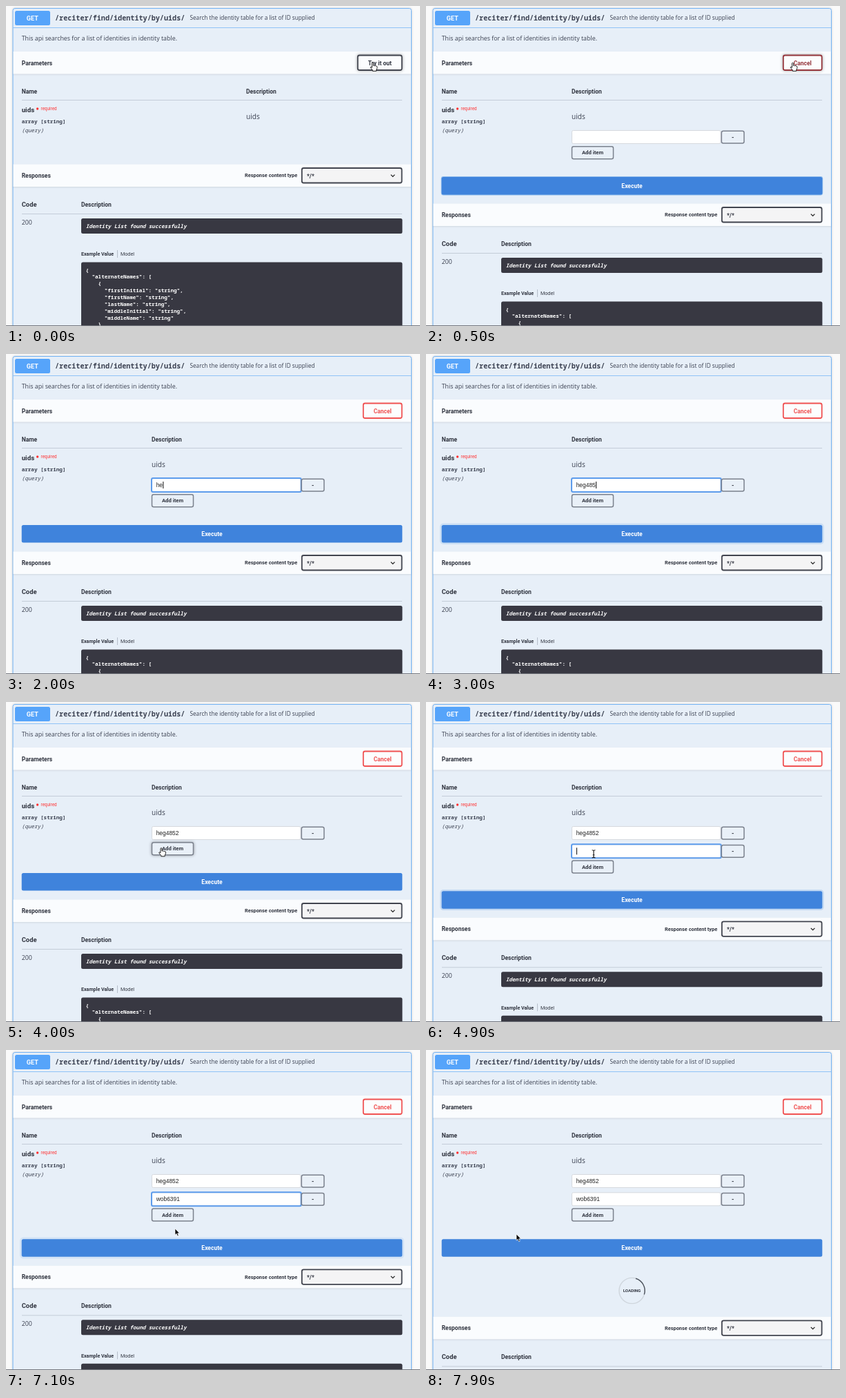
Write an HTML page that moves like this. It is 600 by 464 pixels and loops after 8000 ms.

```html
<!DOCTYPE html>
<html lang="en">
<head>
<meta charset="utf-8">
<title>API explorer</title>
<style>
html, body { margin: 0; width: 100%; height: 100%; overflow: hidden; background: #fafafa; }
svg { display: block; width: 600px; height: 464px; }
text { fill: #3b4151; white-space: pre; }
.h { font: 700 8.5px Roboto, sans-serif; fill: #30343f; }
.o { font: 8.86px "Open Sans", sans-serif; }
.m { font: 600 7.6px "Noto Sans Mono", monospace; }
.in { font: 8.44px "Liberation Sans", Arial, sans-serif; fill: #222; }
.mid { text-anchor: middle; }
.w { fill: #fff; }
.line { stroke: #c3ccd8; stroke-width: 1; }
.band { fill: #fafcfe; filter: drop-shadow(0 1px 1px rgba(0, 0, 0, .1)); }
.dark { fill: #383842; }
.box { fill: #fff; stroke: #d6d9de; }
.btn { fill: #e9f0f8; stroke: #7b818d; stroke-width: 1.5; }
.hover { filter: drop-shadow(0 0 2px rgba(0, 0, 0, .35)); }
.ring { fill: none; stroke: #5d9cec; stroke-width: 2; }
.caret { fill: #111; }
</style>
</head>
<body>
<svg viewBox="0 0 600 464">
  <rect width="600" height="464" fill="#fafafa"/>
  <rect x="10" y="3.5" width="577.5" height="480" rx="3" fill="#e7eff8" stroke="#73b3f5"
    style="filter:drop-shadow(0 0 1.5px rgba(0,0,0,.19))"/>
  <path d="M10 31.5H587" stroke="#8fc2f6"/>
  <rect x="13" y="7" width="51" height="21" rx="2.5" fill="#56a4fa"/>
  <text class="h mid" x="38.3" y="20.7" style="font-size:9px;fill:#fff">GET</text>
  <text class="m" x="71" y="20.7" style="font-size:10.13px">/reciter/find/identity/by/uids/</text>
  <text class="o" x="266.5" y="20.4" style="font-size:8.23px">Search the identity table for a list of ID supplied</text>
  <text class="o" x="22.7" y="50">This api searches for a list of identities in identity table.</text>

  <rect class="band" x="10.5" y="66" width="576.5" height="32.5"/>
  <text class="h" x="22.7" y="85.7">Parameters</text>
  <g id="toggle">
    <rect id="toggleBox" y="71.5" height="21.5" rx="2.5" fill="#fcfdfe" stroke-width="1.8"/>
    <text id="toggleText" class="h mid" y="85.7"></text>
  </g>

  <text class="h" x="22.7" y="126.7">Name</text>
  <path class="line" d="M23 136.5H574"/>
  <text class="h" x="22.7" y="154" style="font-size:9.7px">uids</text>
  <circle cx="45.6" cy="149" r="1.7" fill="#f33"/>
  <text class="h" x="50.6" y="151.2" style="font-weight:400;font-size:6.3px;fill:#f33">required</text>
  <text class="m" x="22.7" y="170">array [string]</text>
  <text class="m" x="22.7" y="183" style="font-weight:400;font-style:italic">(query)</text>
  <g id="desc">
    <text class="h" x="211" y="126.7">Description</text>
    <text class="o" x="211" y="164" style="font-size:10.13px">uids</text>
  </g>

  <g id="form">
    <g id="rows"></g>
    <g id="add">
      <rect class="btn" x="211.5" y="203.7" width="60" height="18" rx="2.5"/>
      <text class="h mid" x="241.5" y="215.3" style="font-size:7.7px">Add item</text>
    </g>
    <g id="exec">
      <rect id="pulse" fill="#4990e2"/>
      <rect x="22.7" y="248" width="551.6" height="25.5" rx="2.5" fill="#3f83dc"/>
      <text class="h w mid" x="298.5" y="263.8">Execute</text>
    </g>
  </g>

  <g id="loading">
    <circle cx="298.5" cy="349" r="18.6" fill="none" stroke="rgba(85,85,85,.16)" stroke-width="1.4"/>
    <path id="arc" d="M285.35 335.85A18.6 18.6 0 0 1 311.65 335.85" fill="none" stroke="#4d535d" stroke-width="1.4"/>
    <text class="h mid" x="298.5" y="351.2" style="font-size:6.1px">LOADING</text>
  </g>

  <g id="resp">
    <rect class="band" x="10.5" y="229.5" width="576.5" height="32.5"/>
    <text class="h" x="22.7" y="249">Responses</text>
    <text class="h" x="346" y="248.3" style="font-size:7.4px">Response content type</text>
    <rect x="428.8" y="235" width="144.8" height="21.5" rx="2.5" fill="#f4f4f5" stroke="#41444e" stroke-width="1.8"/>
    <text class="h" x="436" y="249.5">*/*</text>
    <path d="M557.8 244.6l2.8 2.8l2.8-2.8" fill="none" stroke="#222" stroke-width="1.3"/>
    <text class="h" x="22.7" y="291" style="font-size:9.4px">Code</text>
    <text class="h" x="109" y="291">Description</text>
    <path class="line" d="M23 301.5H574"/>
    <text class="o" x="22.7" y="317">200</text>
    <rect class="dark" x="109" y="308" width="465.4" height="22" rx="2.5"/>
    <text class="m w" x="115.7" y="321.8" style="font-style:italic;font-weight:700">Identity List found successfully</text>
    <text class="h" x="109" y="362.3" style="font-size:7.1px">Example Value</text>
    <path d="M161.5 354V365" stroke="#aab1bd" stroke-width=".8"/>
    <text class="h" x="166" y="362.3" style="font-weight:400;font-size:7.2px">Model</text>
    <rect class="dark" x="109" y="371.5" width="465.4" height="130" rx="2.5"/>
    <g id="code"></g>
  </g>
  <path d="M0 463.5H600" stroke="#74777e"/>

  <g id="cursor" stroke-linejoin="round">
    <path id="arrow" d="M0 0V9.2L2.1 7.3L3.6 10.8L5.2 10.1L3.7 6.8H6.5Z" fill="#000" stroke="#fff" stroke-width=".7"/>
    <path id="hand" d="M-1 .8Q0-.6 1 .8V4.6Q2.2 3.6 2.9 4.8Q4.2 4 4.8 5.2Q6.4 4.6 6.5 6.4Q6.6 9 5.2 10.6V12.3H-.2V11Q-2 9.2-3.4 6.8Q-3.2 5.4-1 7.2Z"
      fill="#fff" stroke="#111" stroke-width=".9"/>
    <path id="beam" d="M-2.4-5.3Q0-5.3 0-4V4.6Q0 5.8-2.4 5.8M2.4-5.3Q0-5.3 0-4M0 4.6Q0 5.8 2.4 5.8M-1.3 1.8H1.3" fill="none" stroke="#111" stroke-width="1.1"/>
  </g>
</svg>
<script>
const LOOP = 8000, OPEN = 300, ADD = 4150, SEND = 7700, ROW = 26.3;
const $ = id => document.getElementById(id);
const show = (el, on) => { el.style.display = on ? "" : "none"; };
const move = (el, x, y) => el.setAttribute("transform", `translate(${x} ${y})`);
const attrs = (el, o) => { for (const k in o) el.setAttribute(k, o[k]); };
const mix = (a, b, k) => a + (b - a) * k;
const ease = k => k * k * (3 - 2 * k);
const unit = k => Math.max(0, Math.min(1, k));

const fields = [
  { text: "heg4852", born: OPEN, focus: 1250, blur: 3900, keys: [1800, 1950, 2150, 2450, 2650, 2850, 3050] },
  { text: "wob6391", born: ADD, focus: 4700, blur: 7550, keys: [5300, 5450, 5600, 5850, 6000, 6150, 6300] }
];

// Pointer stops: time, x, y
const stops = [
  [0, 531.5, 82], [650, 531.5, 82], [1150, 243, 191], [3350, 243, 191], [3800, 225, 211.5],
  [4250, 225, 211.5], [4600, 243, 220], [6700, 243, 220], [7050, 245, 259], [7100, 245, 259],
  [7400, 190, 285], [7650, 190, 285], [7880, 131, 267], [8000, 131, 267]
];

$("rows").innerHTML = fields.map((f, i) => `<g transform="translate(0 ${i * ROW})">
  <rect class="box" x="211.5" y="180.5" width="215.5" height="19" rx="2"/>
  <rect class="ring" x="211" y="180" width="216.8" height="20" rx="2"/>
  <text class="in" x="217.7" y="193.2"></text>
  <rect class="caret" y="185" width="1" height="10"/>
  <rect class="btn" x="428.3" y="181.3" width="32.7" height="17.6" rx="2.5"/>
  <text class="h mid" x="444.7" y="192.5">-</text></g>`).join("");
fields.forEach((f, i) => {
  f.el = $("rows").children[i];
  [f.ring, f.label, f.caret] = [".ring", ".in", ".caret"].map(s => f.el.querySelector(s));
});

const names = ["firstInitial", "firstName", "lastName", "middleInitial", "middleName"];
const code = ["{", '  "alternateNames": [', "    {",
  ...names.map((n, i) => `      "${n}": "string"${i < 4 ? "," : ""}`), "    }", "  ],"];
$("code").innerHTML = code.map((s, i) =>
  `<text class="m w" x="115.4" y="${385.6 + i * 9.85}" style="font-weight:700">${s}</text>`).join("");

function pointer(t) {
  let i = 1;
  while (i < stops.length - 1 && stops[i][0] < t) i++;
  const [a, b] = [stops[i - 1], stops[i]];
  const k = ease(unit((t - a[0]) / (b[0] - a[0])));
  return [mix(a[1], b[1], k), mix(a[2], b[2], k)];
}

function drawField(f, t) {
  show(f.el, t >= f.born);
  const focused = t >= f.focus && t < f.blur;
  const typed = f.keys.filter(k => t >= k);
  const last = typed.length ? typed[typed.length - 1] : f.focus;
  f.label.textContent = f.text.slice(0, typed.length);
  show(f.ring, focused);
  show(f.caret, focused && (t - last) % 1000 < 500);
  f.caret.setAttribute("x", 218 + (typed.length ? f.label.getComputedTextLength() : 0));
}

function drawToggle(t, open, hover) {
  const left = open ? 517.8 : 509.8;
  const k = open ? unit((t - OPEN) / 500) : 0;
  const [from, to] = open ? [[90, 35, 45], [240, 82, 82]] : [[65, 68, 78], [65, 68, 78]];
  const color = `rgb(${from.map((c, i) => Math.round(mix(c, to[i], k)))})`;
  attrs($("toggleBox"), { x: left, width: 573.7 - left, stroke: color });
  attrs($("toggleText"), { x: (left + 573.7) / 2 });
  $("toggleText").style.fill = open ? color : "";
  $("toggleText").textContent = open ? "Cancel" : "Try it out";
  $("toggle").classList.toggle("hover", hover);
}

function drawPulse(t) {
  const k = unit(((t - OPEN) % 2000) / 1400);
  const e = 1 - (1 - k) ** 2.2;
  const s = 3.2 * e;
  attrs($("pulse"), { x: 22.7 - s, y: 248 - s, width: 551.6 + 2 * s, height: 25.5 + 2 * s,
    rx: 2.5 + s, opacity: .8 * (1 - e) });
}

function drawCursor(t, x, y, open, extra) {
  const inside = (l, top, r, b) => x >= l && x <= r && y >= top && y <= b;
  const onToggle = inside(509, 71, 575, 94);
  const onAdd = open && inside(211, 203 + extra, 272, 222 + extra);
  const onExec = open && inside(23, 248 + extra, 574, 273 + extra);
  const onField = open && inside(211, 180, 427, 200 + extra);
  const hand = onToggle || onAdd || onExec;
  show($("hand"), hand);
  show($("beam"), !hand && onField);
  show($("arrow"), !hand && !onField);
  // The pointer hides while keys are being pressed
  show($("cursor"), !fields.some((f, i) => t >= f.keys[0] && t < stops[i ? 7 : 3][0]));
  move($("cursor"), x, y);
  $("add").classList.toggle("hover", onAdd);
  $("exec").classList.toggle("hover", onExec);
  return onToggle;
}

function draw(t) {
  const open = t >= OPEN, busy = t >= SEND;
  const extra = t >= ADD ? ROW : 0;
  const [x, y] = pointer(t);
  const onToggle = drawCursor(t, x, y, open, extra);
  drawToggle(t, open, onToggle);
  show($("form"), open);
  move($("desc"), open ? 0 : 137, 0);
  move($("add"), 0, extra);
  move($("exec"), 0, extra);
  move($("resp"), 0, open ? 57 + extra + (busy ? 74 : 0) : 0);
  fields.forEach(f => drawField(f, t));
  if (open) drawPulse(t);
  show($("loading"), busy);
  $("arc").setAttribute("transform", `rotate(${(t - SEND) * .36 - 10} 298.5 349)`);
}

let start;
function tick(now) {
  start ??= now;
  draw((now - start) % LOOP);
  requestAnimationFrame(tick);
}
draw(0);
requestAnimationFrame(tick);
</script>
</body>
</html>
```
